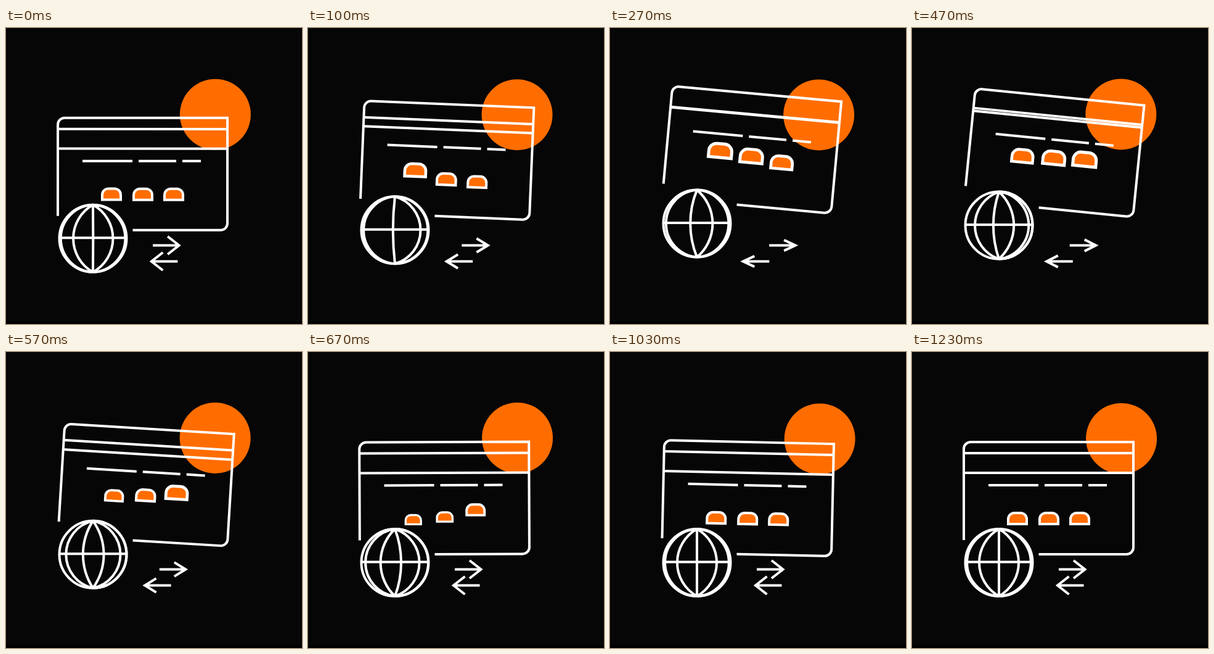
Recreate the animation shown at these times as an HTML page. Size 480 px wide and 480 px high, loop 1.27 s.

```html
<!DOCTYPE html>
<html>
<head>
<meta charset="utf-8">
<style>
  html, body { margin: 0; width: 100%; height: 100%; overflow: hidden; background: #000; }
  svg { display: block; width: 100vw; height: 100vh; }
  .line { fill: none; stroke: #fff; stroke-width: 4; }
</style>
</head>
<body>
<svg viewBox="0 0 480 480">
  <rect width="480" height="476" fill="#060606"/>
  <circle id="sun" r="57.5" fill="#ff6d00"/>
  <g id="card" class="line">
    <path d="M84 305V157a11 11 0 0 1 11-11H359V317a11 11 0 0 1-11 11H205.5"/>
    <path id="stripes"/>
    <path d="M124 216H205M215 216H276M286 216H316"/>
    <g id="tokens" fill="#ff6d00"></g>
  </g>
  <g id="globe" class="line">
    <circle r="54.5"/>
    <path d="M-54.5-1H54.5"/>
    <path id="meridians"/>
  </g>
  <path id="arrows" class="line"/>
</svg>
<script>
const LOOP = 1270, RADIUS = 54.5;
const $ = id => document.getElementById(id);
const set = (el, name, value) => el.setAttribute(name, value);
const clamp = v => Math.min(1, Math.max(0, v));
const progress = (t, from, to) => clamp((t - from) / (to - from));
const smooth = s => s * s * (3 - 2 * s);
const easeOut = (s, power) => 1 - (1 - s) ** power;

// Linear interpolation through [time, value] pairs
function track(t, keys) {
  const i = keys.findIndex(key => key[0] > t);
  if (i < 0) return keys[keys.length - 1][1];
  const [t0, v0] = keys[i - 1], [t1, v1] = keys[i];
  return v0 + (v1 - v0) * (t - t0) / (t1 - t0);
}

// Hop up and land; the two halves can be delayed separately
const hop = (t, upDelay = 0, downDelay = 0) => clamp(
  easeOut(progress(t - upDelay, 0, 333), 2.2) - progress(t - downDelay, 333, 667) ** 2.2);

function tilt(t) {
  if (t < 400) return 6.3 * easeOut(t / 400, 1.6);
  if (t < 667) return 6.3 * (1 - progress(t, 400, 667) ** 1.8);
  if (t < 770) return -4.1 * Math.sin(progress(t, 667, 770) * Math.PI / 2);
  if (t < 1090) return -4.1 + 5.9 * smooth(progress(t, 770, 1090));
  return 1.8 * (1 - smooth(progress(t, 1090, 1232)));
}

const tokens = [
  { x: 171, up: 0, down: 0 },
  { x: 222, up: 88, down: 30 },
  { x: 272, up: 155, down: 110 }
];
for (const token of tokens) {
  token.el = document.createElementNS('http://www.w3.org/2000/svg', 'path');
  set(token.el, 'd', 'M-15-1V-9a10 10 0 0 1 10-10H5a10 10 0 0 1 10 10V-1Z');
  $('tokens').append(token.el);
}

function drawToken({ el, x, up, down }, t) {
  const height = hop(t, up, down), local = t - down;
  let scale = 1 + 0.25 * height;
  if (local > 667) scale = 0.83 + 0.17 * smooth(progress(local, 667, 907));
  else if (local > 333 && t > up + 333) scale = 0.83 + 0.42 * height ** 2;
  set(el, 'transform', `translate(${x} ${280 - 25 * height}) scale(${scale})`);
}

const spinKeys = [[0, 0], [167, 1.5], [267, 2.65], [467, 4.7], [667, 6.28], [867, 7]];
const spreadKeys = [[0, 0], [167, 1.04], [267, 0.25], [467, 0]];
const limitKeys = [[0, 90], [167, 70], [267, 70], [467, 90]];

function meridianPath(t) {
  const offset = track(t, spinKeys) % 1;
  const spread = track(t, spreadKeys), limit = track(t, limitKeys);
  let d = '';
  for (let k = -2; k <= 2; k++) {
    const u = k + offset;
    const angle = Math.max(-limit, Math.min(limit, 36 * u * (1 + spread * u * u)));
    const x = RADIUS * Math.sin(angle * Math.PI / 180);
    const bulge = Math.max(Math.abs(x), 0.1);
    const r = (RADIUS ** 2 + bulge ** 2) / (2 * bulge);
    d += `M0 ${-RADIUS}A${r} ${r} 0 0 ${x > 0 ? 1 : 0} 0 ${RADIUS}`;
  }
  return d;
}

function arrow(tail, tip, y, half) {
  const back = tip - Math.sign(tip - tail) * 18.5;
  return `M${tail} ${y}H${tip}M${back} ${y - half}L${tip} ${y}L${back} ${y + half}`;
}

function draw(t) {
  const lift = hop(t), turn = t / LOOP * Math.PI;
  set($('sun'), 'cx', 339.4 - 0.8 * Math.sin(2 * turn));
  set($('sun'), 'cy', 140.2 + 0.8 * Math.sin(3 * turn));

  set($('card'), 'transform', `translate(0 ${-41 * lift}) rotate(${tilt(t)} 221.5 328)`);
  const gap = 16 * (1 - lift);
  set($('stripes'), 'd', `M84 ${180 - gap}H359M84 ${180 + gap}H359`);
  tokens.forEach(token => drawToken(token, t));

  set($('globe'), 'transform', `translate(141 ${341.5 - 25 * lift})`);
  set($('meridians'), 'd', meridianPath(t));

  const shift = 20.7 * lift, half = 14.5 - 6 * lift;
  set($('arrows'), 'd',
    arrow(238 + shift, 280.5 + shift, 352.5, half) +
    arrow(278.5 - shift, 236 - shift, 378.5, half));
}

function frame() {
  draw(performance.now() % LOOP);
  requestAnimationFrame(frame);
}
frame();
</script>
</body>
</html>
```
